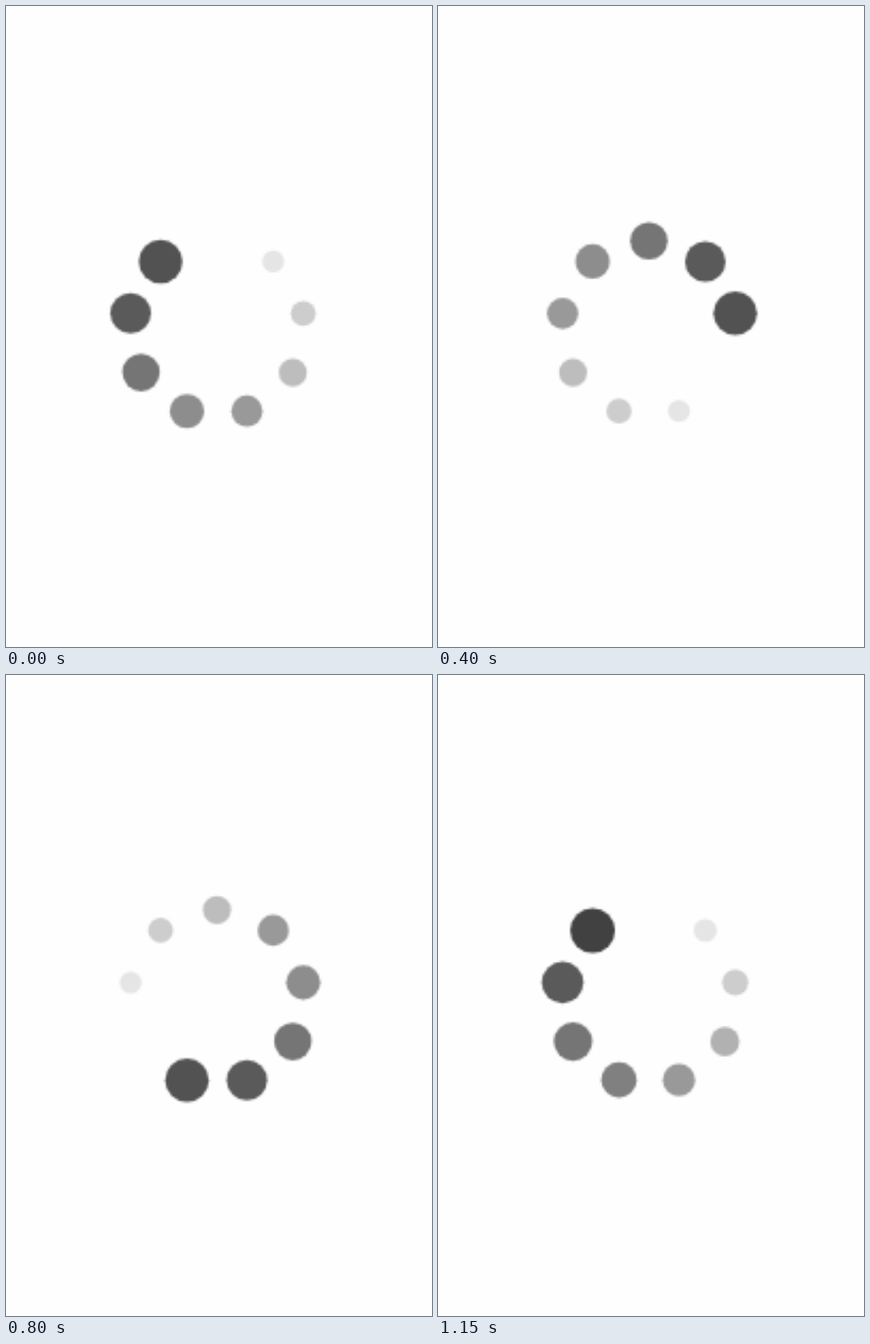
These frames come from a looping animation (610 by 917 pixels, 1.2 s). An HTML page with a canvas:

```html
<!DOCTYPE html>
<html lang="en">
<head>
<meta charset="utf-8">
<title>Loading</title>
<style>
  html, body { margin: 0; width: 100%; height: 100%; overflow: hidden; background: #fefefe; }
  canvas { display: block; width: 610px; height: 917px; }
</style>
</head>
<body>
<canvas id="stage" width="200" height="301"></canvas>
<script>
const W = 610, H = 917;
const STEP = 50, STEPS = 24;
const DOTS = 9;
const UNITS = 72; // common grid of steps (3 units) and dots (8 units)
const CX = 302, CY = 461.5, RING = 125.5;
const R_MAX = 33.5, R_MIN = 13.4;
const PAPER = 254;
const GREYS = [52, 65, 82, 90, 104, 117, 128, 141, 153, 177, 189, 205, 229, PAPER];

// The coarse bitmap, enlarged by CSS, gives the dots their soft edges.
const canvas = document.getElementById('stage');
const ctx = canvas.getContext('2d');
ctx.scale(canvas.width / W, canvas.height / H);

const lerp = (a, b, p) => a + (b - a) * p;
const nearestGrey = v =>
  GREYS.reduce((best, g) => Math.abs(g - v) < Math.abs(best - v) ? g : best);

// Life of a dot, from just above 0 (newborn) to 1 (gone)
function lifeOf(dot, step) {
  const units = (step * 3 - dot * 8 + UNITS) % UNITS;
  return (units || UNITS) / UNITS;
}

function drawDot(dot, life) {
  const grey = nearestGrey(lerp(51.5, 255, life));
  if (grey === PAPER) return;
  const angle = dot / DOTS * Math.PI * 2;
  ctx.fillStyle = `rgb(${grey},${grey},${grey})`;
  ctx.beginPath();
  ctx.arc(CX + RING * Math.sin(angle), CY - RING * Math.cos(angle),
          lerp(R_MAX, R_MIN, life), 0, Math.PI * 2);
  ctx.fill();
}

function draw(step) {
  ctx.fillStyle = `rgb(${PAPER},${PAPER},${PAPER})`;
  ctx.fillRect(0, 0, W, H);
  for (let dot = 0; dot < DOTS; dot++) drawDot(dot, lifeOf(dot, step));
}

const start = performance.now();
function tick() {
  const time = Math.max(0, performance.now() - start);
  draw(Math.floor(time / STEP) % STEPS);
  requestAnimationFrame(tick);
}
tick();
</script>
</body>
</html>
```
